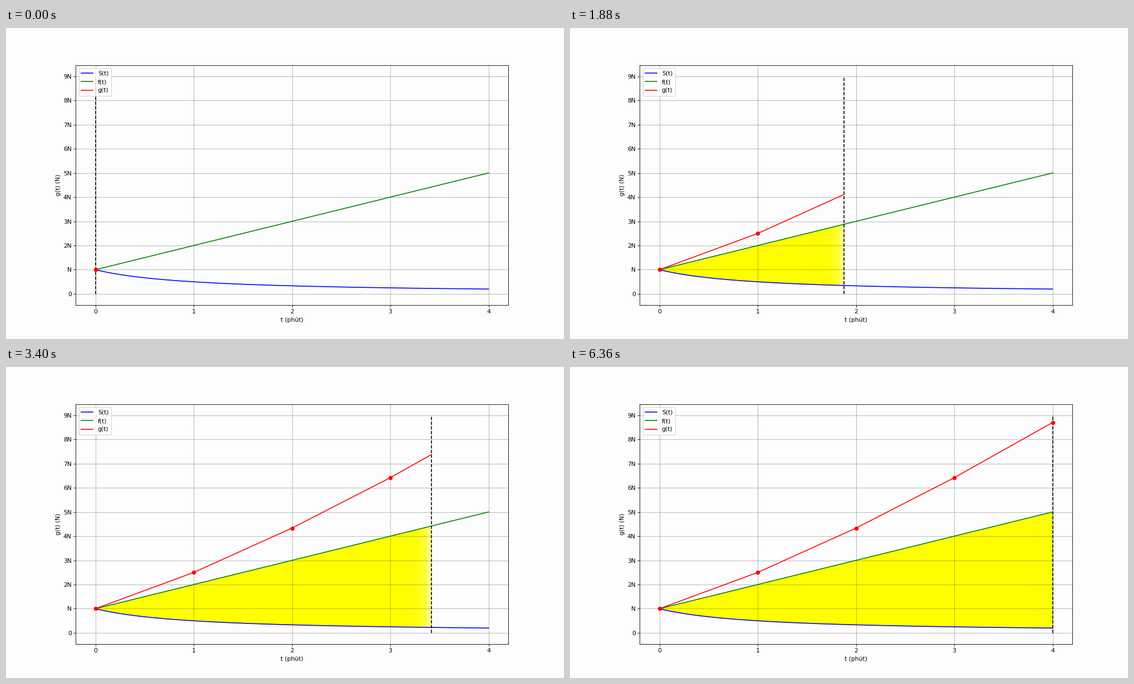
A matplotlib script for the animation above (6.4 s loop, 1002 by 559 pixels).

```python
import numpy as np
import matplotlib.pyplot as plt
from matplotlib.animation import FuncAnimation
from matplotlib.patches import Polygon

plt.rcParams["font.family"] = "DejaVu Sans"
plt.rcParams["font.size"] = 10

WIDTH, HEIGHT, DPI = 1002, 559, 77
FRAMES, INTERVAL = 160, 40
LAYERS, ALPHA = 8, 0.5    # stacked translucent fills behind the sweep line
HOLD_LAYERS = 3           # extra fills added once the sweep has ended
PAPER = "#fdfdfd"

# 25 steps per minute; the last minute includes its end point
times = np.concatenate([np.arange(75) / 25, np.linspace(3, 4, 25)])
LAST = len(times) - 1

knots = np.arange(5)
steps = np.cumsum(1 / np.arange(1, 6))
g_knots = np.cumsum(steps)


def s(t):
    return 1 / (1 + t)


def f(t):
    return 1 + t


def time_at(i):
    return times[min(max(i, 0), LAST)]


def area(t):
    x = np.linspace(0, t, 60)
    return np.column_stack([np.r_[x, x[::-1]], np.r_[s(x), f(x[::-1])]])


# the small margin keeps the pixel size from rounding down
fig, ax = plt.subplots(figsize=((WIDTH + 0.01) / DPI, (HEIGHT + 0.01) / DPI),
                       dpi=DPI, facecolor=PAPER)
fig.subplots_adjust(left=0.125, right=0.9, bottom=0.11, top=0.88)
ax.set_facecolor(PAPER)
ax.grid(True, color="black", alpha=0.31)
ax.set_xlim(-0.2, 4.2)
ax.set_ylim(-0.45, 9.45)
ax.set_xticks(range(5))
ax.set_yticks(range(10), ["0", "N"] + [f"{k}N" for k in range(2, 10)])
ax.set_xlabel("t (phút)")
ax.set_ylabel("g(t) (N)")

curve = np.linspace(0, 4, 200)
ax.plot(curve, s(curve), "b", label="S(t)")
ax.plot(curve, f(curve), "g", label="f(t)")
sweep, = ax.plot([], [], "k--")
g_line, = ax.plot([], [], "r", label="g(t)")
dots, = ax.plot([], [], "ro")
ax.legend(loc="upper left")


def add_fill(alpha):
    patch = Polygon(area(0), closed=True, facecolor="yellow", alpha=alpha,
                    linewidth=0, zorder=1)
    return ax.add_patch(patch)


base = add_fill(1)
layers = [add_fill(ALPHA) for _ in range(LAYERS)]


def update(n):
    t = time_at(n)
    top = min(n, LAST + HOLD_LAYERS)
    base.set_xy(area(time_at(top - LAYERS)))
    for k, layer in enumerate(layers):
        layer.set_xy(area(time_at(top - k)))

    done = knots <= t + 1e-9
    sweep.set_data([t, t], [0, 9])
    dots.set_data(knots[done], g_knots[done])
    g_line.set_data(np.r_[knots[done], t],
                    np.r_[g_knots[done], np.interp(t, knots, g_knots)])
    return base, *layers, sweep, dots, g_line


anim = FuncAnimation(fig, update, frames=FRAMES, interval=INTERVAL,
                     init_func=lambda: update(0), repeat=True,
                     repeat_delay=0, blit=False)
plt.show()
```
